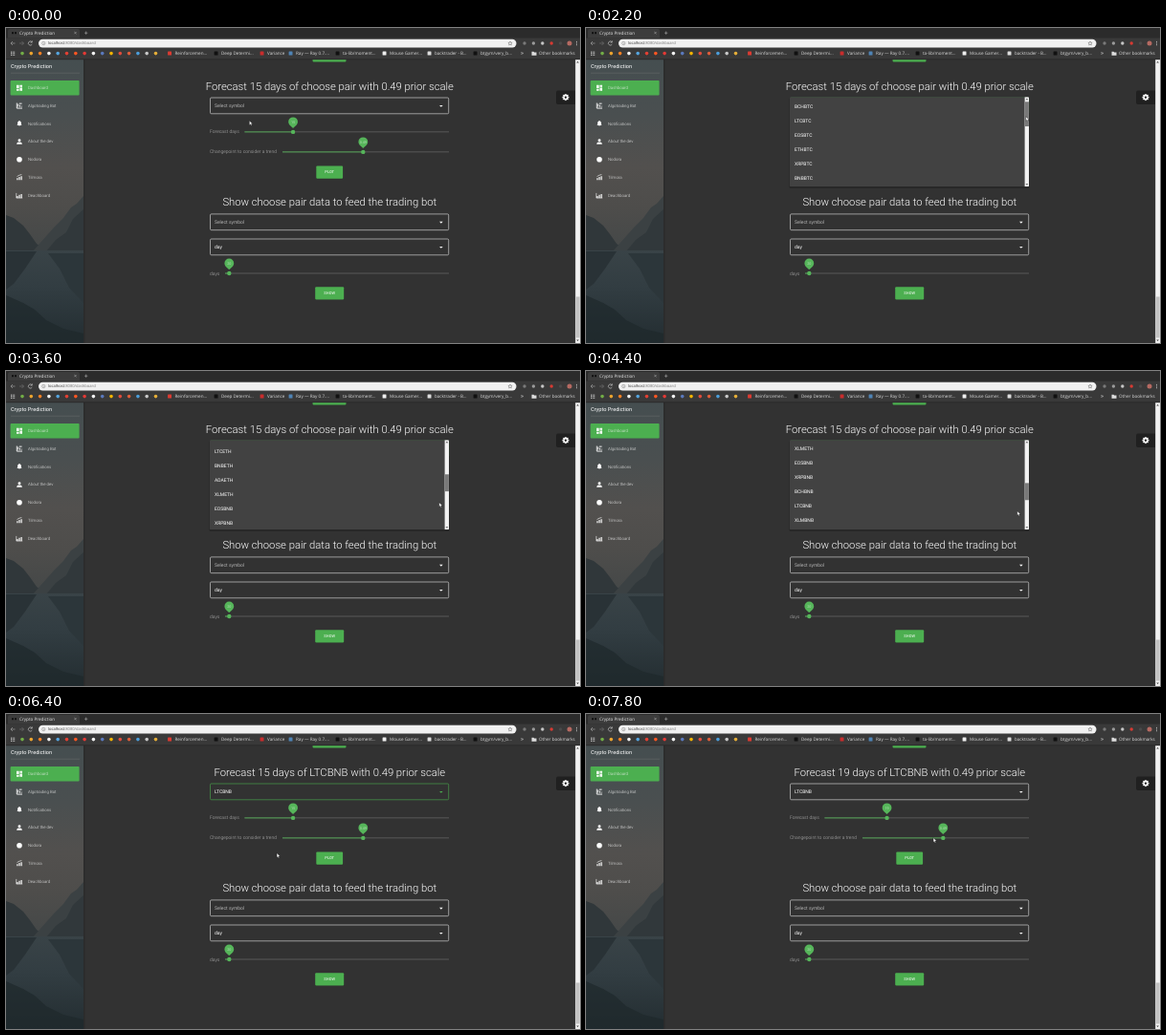
Recreate the animation shown at these times as an HTML page. Size 600x330 px, loop 8 s.

```html
<!DOCTYPE html>
<html lang="en">
<head>
<meta charset="utf-8">
<title>Crypto Prediction</title>
<style>
  html, body { margin: 0; width: 100%; height: 100%; overflow: hidden; background: #323232; }
  svg { display: block; width: 100vw; height: 100vh; font-family: Roboto, sans-serif; text-rendering: geometricPrecision; }
  .chrome { font-family: "Open Sans", sans-serif; }
</style>
</head>
<body>
<svg id="stage" viewBox="0 0 600 330"></svg>
<script>
const GREEN = '#4caf50', BORDER = '#e4e4e4';
const LOOP = 8000, STEP = 200;
const ROW = 15, LIST_TOP = 74.7, VIEW = 94, TRACK_TOP = 77.3, TRACK = 83.6;
const DAYS_X = 249.4, DAY_WIDTH = 3.62;

const pairs = (base, coins) => coins.split(' ').map(coin => coin + base);
const symbols = [
  ...pairs('BTC', 'BCH LTC EOS ETH XRP BNB ADA XLM'),
  ...pairs('ETH', 'EOS XRP BCH LTC BNB ADA XLM'),
  ...pairs('BNB', 'EOS XRP BCH LTC XLM ADA'),
  ...pairs('USDT', 'BCH LTC EOS ETH XRP BNB ADA XLM')
];

// Time, then one or more values
const cursorPath = [
  [0, 255.6, 99.4], [200, 255, 95], [400, 255, 86], [1000, 255, 86], [1200, 258, 88],
  [2000, 461, 95], [2400, 461, 95], [3400, 454, 138], [3600, 454, 140], [4400, 452, 149],
  [5000, 452, 149], [5800, 285, 148], [6200, 285, 148], [6400, 284.3, 148], [6800, 300, 109],
  [7000, 300, 109], [7400, 314, 109], [7800, 364.3, 132]
];
const scrollPath = [[2400, 0], [3400, 156], [3600, 163], [4400, 211]];
const menuFade = [[200, 0], [400, .6], [600, .94], [800, 1], [6000, 1], [6200, .6], [6400, 0]];
const daysPath = [[7000, 15], [7400, 19]];

function sample(path, t) {
  const next = path.findIndex(key => key[0] > t);
  if (next === 0) return path[0].slice(1);
  if (next < 0) return path[path.length - 1].slice(1);
  const a = path[next - 1], b = path[next];
  const k = (t - a[0]) / (b[0] - a[0]);
  return a.slice(1).map((v, i) => v + (b[i + 1] - v) * k);
}

const rect = (x, y, w, h, fill, more = '') =>
  `<rect x="${x}" y="${y}" width="${w}" height="${h}" fill="${fill}" ${more}/>`;
const dot = (x, y, r, fill, more = '') => `<circle cx="${x}" cy="${y}" r="${r}" fill="${fill}" ${more}/>`;
const path = (d, fill, more = '') => `<path d="${d}" fill="${fill}" ${more}/>`;
const stroke = (d, color, width, more = '') =>
  path(d, 'none', `stroke="${color}" stroke-width="${width}" ${more}`);
// y is the vertical middle of the line
const text = (x, y, s, size, fill = '#fff', more = '') =>
  `<text x="${x}" y="${y + size * .355}" font-size="${size}" fill="${fill}" ${more}>${s}</text>`;
const gradient = (id, ...stops) => `<linearGradient id="${id}" x2="0" y2="1">`
  + stops.map(([at, color]) => `<stop offset="${at}" stop-color="${color}"/>`).join('') + '</linearGradient>';
const centred = 'text-anchor="middle"';

function browser() {
  let out = rect(0, 0, 600, 33, '#393939') + rect(0, 0, 600, 10.5, '#2b2b2b')
    + path('M2 10.5V3Q2 1 4 1H75Q77 1 77 3V10.5Z', '#3c3c3c')
    + rect(6, 4.2, 2, 2, '#111') + rect(9, 4.2, 2, 2, '#111')
    + text(14, 5, 'Crypto Prediction', 4.6, '#e8e8e8')
    + stroke('M71.4 4l2.2 2.2m0-2.2l-2.2 2.2M82 5.2h3.4m-1.7-1.7v3.4', '#c0c0c0', .5)
    + stroke('M9.5 16H5m2-2l-2 2 2 2', '#aaa', .6)
    + stroke('M14 16h4.5m-2-2l2 2-2 2', '#777', .6)
    + stroke('M27 14.6A2.1 2.1 0 1 0 27.3 17M27.3 13.3v1.8h-1.8', '#d0d0d0', .6)
    + rect(34, 11.7, 499.5, 8.7, '#f1f1f1', 'rx="4.3"')
    + dot(39.3, 16, 1.7, 'none', 'stroke="#777" stroke-width=".5"') + rect(39.1, 15.6, .4, 1.4, '#777')
    + text(44, 16, '<tspan fill="#333">localhost</tspan>:8080/dashboard', 4.1, '#777')
    + stroke('M527 13.9l.6 1.4 1.5.2-1.1 1 .3 1.5-1.3-.8-1.3.8.3-1.5-1.1-1 1.5-.2z', '#555', .45);
  ['#7a7a7a', '#9a9a9a', '#c6c6c6', '#d63a32', '#4a4a4a'].forEach((c, i) => out += dot(542 + i * 9.4, 16, 1.7, c));
  out += dot(589, 16, 2.5, '#b56a62') + [14.2, 16, 17.8].map(y => dot(596.5, y, .5, '#ddd')).join('');

  for (let i = 0; i < 9; i++) out += rect(5 + i % 3 * 1.6, 24.6 + Math.floor(i / 3) * 1.6, 1, 1, '#ccc');
  ['#72ad47', '#eda52f', '#f48024', '#f2f2f2', '#56a5e0', '#e34033', '#ff5722', '#e53935', '#f2f2f2',
    '#5a79bd', '#f4b400', '#e24b3b', '#df5d3a', '#4b9edb', '#c9c9c9', '#e5ae38']
    .forEach((c, i) => out += dot(17 + i * 9.3, 26.6, 1.8, c));
  [[176.5, 'Reinforcemen...', '#dc3b32'], [225, 'Deep Determi...', '#111'], [273, 'Variance', '#c92c2c'],
    [303, 'Ray — Ray 0.7....', '#4f83b5'], [352, 'ta-lib/moment...', '#111'], [401, 'Mouse Gamer...', '#eee'],
    [448, 'backtrader - B...', '#ddd'], [496, 'btgym/very_b...', '#111']]
    .forEach(([x, s, c]) => out += rect(x - 7.4, 24.6, 3.9, 3.9, c, 'rx=".5"') + text(x, 26.4, s, 4.6, '#dadada'));
  return out + text(538, 26, '»', 6, '#ddd') + path('M549.5 24.7h2l.7.7h2.3v3.3h-5z', '#ddd')
    + text(557, 26.4, 'Other bookmarks', 4.6, '#dadada') + rect(0, 32.5, 600, .7, '#252525');
}

function sidebar() {
  const items = ['Dashboard', 'Algotrading Bot', 'Notifications', 'About the dev', 'Nodora', 'Tilmora', 'Deachboard'];
  const bars = path('M-2.7.6h1.2v2.2h-1.2zM-.6-.6H.6v3.4H-.6zM1.5-1.4h1.2v4.2H1.5z', '#fff');
  const icons = [
    path('M-3-3h2.6v3.4h-2.6zM.4-3H3v2H.4zM-3 1.1h2.6V3h-2.6zM.4-.3H3V3H.4z', '#fff'),
    stroke('M-2.7-3v5.5H3M-1.2 1v-3M.5 1v-1.8M2.2 1v-1M-.2-2.4H2.6', '#fff', .9),
    path('M-2.6 1.8l.7-.8v-1.7q0-1.7 1.3-2.1a.6.6 0 0 1 1.2 0q1.3.4 1.3 2.1v1.7l.7.8zM-.7 2.3h1.4q-.7 1-1.4 0', '#fff'),
    dot(0, -1.4, 1.45, '#fff') + path('M-2.8 2.6V1.9Q-2.4.5 0 .5t2.8 1.4v.7z', '#fff'),
    dot(0, 0, 2.8, '#fff'),
    bars + stroke('M-2.5-1L0-2.4 2.4-3', '#fff', .6),
    bars + stroke('M-3.2-2.4v5.2H3.2', '#fff', .6)
  ];
  return gradient('sky', [0, '#454e50'], [.2, '#4a4f50'], [.38, '#52504e'], [.52, '#4e4d4b'], [.66, '#454848'])
    + gradient('water', [0, '#394347'], [.4, '#323d42'], [1, '#232d31'])
    + rect(0, 33, 81, 297, 'url(#sky)')
    + path('M0 196L8 199 18 207 25 216 32 226 40 232 81 234V246H0Z', '#30373a')
    + path('M81 176L74 184 68 188 60 199 51 208 43 217 35 226 28 234 81 238Z', '#3b4143')
    + path('M81 190L70 200 63 214 52 222 42 234H81Z', '#31383b')
    + rect(0, 233, 81, 97, 'url(#water)')
    + path('M0 234H32L20 252 8 268 0 274Z', '#293236')
    + path('M81 236H44L56 252 66 272 81 288Z', '#2c363a')
    + path('M0 280L18 288 30 295 42 306 60 315 81 320V330H0Z', '#1f282c', 'opacity=".7"')
    + text(5, 39.8, 'Crypto Prediction', 5.625)
    + rect(5, 46.9, 72, .35, '#747a7a')
    + rect(4.6, 55, 72, 15.6, GREEN, 'rx="1"')
    + items.map((s, i) => {
      const y = 62.8 + i * 18.75;
      return `<g transform="translate(14 ${y})">${icons[i]}</g>` + text(23, y - .2, s, 4.375, '#f2f2f2', 'font-weight="300"');
    }).join('');
}

const selectBox = (y, label, color, id = '') =>
  rect(213.5, y, 249.2, 16.8, 'none', `rx="1.2" stroke="${BORDER}" stroke-width=".6" ${id && `id="${id}Box"`}`)
  + text(218, y + 8.5, label, 5, color, id && `id="${id}Label"`)
  + path(`M453 ${y + 7.9}h3.7l-1.85 1.9z`, '#fff', id && `id="${id}Arrow"`);

const button = (x, y, w, h, s) =>
  rect(x, y + .5, w, h, '#222', 'rx="1" opacity=".4"') + rect(x, y, w, h, GREEN, 'rx="1"')
  + text(x + w / 2, y + h / 2 - .1, s, 4.06, '#dcefdc', centred + ' font-weight="500"');

const slider = (y, label, start, x, value, id) =>
  text(213, y - .2, label, 5, '#b4b4b4', 'font-weight="300"')
  + rect(start, y - .3, 463 - start, .6, '#707070')
  + rect(start, y - .4, x - start, .8, GREEN, `id="${id}Fill"`)
  + `<g id="${id}Thumb" transform="translate(${x} ${y})">` + dot(0, 0, 2.2, '#56b55a')
  + path('M0-4C-2-5.9-4.9-7.6-4.9-10.6A4.9 4.9 0 1 1 4.9-10.6C4.9-7.6 2-5.9 0-4Z', '#56b55a')
  + text(0, -10.7, value, 3.75, '#b4dfb5', `${centred} id="${id}Value"`) + '</g>';

function settings() {
  let teeth = '';
  for (let a = 0; a < 360; a += 45) teeth += rect(-.75, -3.5, 1.5, 2, '#fff', `transform="rotate(${a})"`);
  return path('M595 65.5H577Q575 65.5 575 67.5V78Q575 80 577 80H595Z', '#202020')
    + `<g transform="translate(585 72.6)">${teeth}${dot(0, 0, 1.9, 'none', 'stroke="#fff" stroke-width="1.3"')}</g>`;
}

const heading = (y, s, id) => text(338.3, y, s, 11.25, '#fff', `${centred} font-weight="300" id="${id}"`);

const menu = () => `<clipPath id="panel">${rect(213, 72.2, 250, VIEW, '#000', 'rx="1"')}</clipPath><g id="menu">`
  + rect(212.5, 73, 251, 95, '#1c1c1c', 'rx="1.5" opacity=".5"')
  + '<g clip-path="url(#panel)">' + rect(213, 72.2, 250, VIEW, '#424242') + '<g id="rows">'
  + rect(213, 0, 246, ROW, '#505050', 'id="hover"')
  + symbols.map((s, i) => text(218, LIST_TOP + ROW * (i + .5), s, 5)).join('') + '</g>'
  + rect(458.6, 72.2, 4.6, VIEW, '#f1f1f1')
  + path('M459.6 75.3h2.6l-1.3-1.6zM459.6 163.2h2.6l-1.3 1.6z', '#505050')
  + rect(458.9, TRACK_TOP, 4, 25, '#a8a8a8', 'id="bar"') + '</g></g>';

const pageScrollbar = () => rect(595.2, 33, 4.8, 297, '#f1f1f1')
  + rect(595.6, 281.5, 4, 43, '#c1c1c1')
  + path('M596.3 36.4h2.6l-1.3-1.6zM596.3 326.6h2.6l-1.3 1.6z', '#505050');

const stage = document.getElementById('stage');
stage.innerHTML = rect(0, 0, 600, 330, '#323232')
  + sidebar()
  + rect(81, 33, 1.5, 297, '#2b2b2b')
  + button(320.5, 24, 35, 11.5, '')
  + heading(60.6, '', 'title')
  + selectBox(73, 'Select symbol', '#b5b5b5', 'pair')
  + slider(108.9, 'Forecast days', DAYS_X, 300, '15', 'days')
  + slider(129.9, 'Changepoint to consider a trend', 289, 373.3, '0.49', 'trend')
  + button(324.3, 144.4, 27.8, 13.4, 'PLOT')
  + heading(182.4, 'Show choose pair data to feed the trading bot', 'subtitle')
  + selectBox(194.9, 'Select symbol', '#b5b5b5')
  + selectBox(221, 'day', '#fff')
  + slider(257, 'days', 229, 233.3, '20', 'period')
  + button(323.2, 271.2, 30, 13.4, 'SHOW')
  + settings() + menu() + pageScrollbar()
  + `<g class="chrome">${browser()}</g>`
  + '<g id="cursor">' + path('M0 0V4.6L1.1 3.7 1.8 5.2 2.6 4.8 1.9 3.4H3.3Z', '#fff', 'stroke="#111" stroke-width=".35" id="arrow"')
  + path('M.2.2Q.8-.3 1.2.3V2L3.6 2.5Q4.3 2.7 4.1 3.5L3.6 5.2H1.2L-.6 3.2Q-.4 2.5.2 2.9Z', '#fff', 'stroke="#111" stroke-width=".35" id="hand"') + '</g>';

const el = id => document.getElementById(id);
const set = (id, attrs) => Object.entries(attrs).forEach(([name, value]) => el(id).setAttribute(name, value));
const show = (id, on) => set(id, { visibility: on ? 'inherit' : 'hidden' });

function draw(t) {
  const [x, y] = sample(cursorPath, t);
  const [scroll] = sample(scrollPath, t);
  const [opacity] = sample(menuFade, t);
  const days = Math.round(sample(daysPath, t)[0]);
  const chosen = t >= 6200, dragging = t >= 2200 && t < 4600;
  const focused = t >= 400 && t < 7000;

  el('title').textContent = `Forecast ${days} days of ${chosen ? 'LTCBNB' : 'choose pair'} with 0.49 prior scale`;
  el('pairLabel').textContent = chosen ? 'LTCBNB' : 'Select symbol';
  set('pairLabel', { fill: chosen ? '#fff' : '#b5b5b5' });
  set('pairBox', { stroke: focused ? GREEN : BORDER });
  set('pairArrow', { fill: focused ? GREEN : '#fff' });

  const daysX = DAYS_X + (days - 1) * DAY_WIDTH;
  set('daysFill', { width: daysX - DAYS_X });
  set('daysThumb', { transform: `translate(${daysX} 108.9)` });
  el('daysValue').textContent = days;

  // More rows load once scrolling begins, so the bar shrinks
  const content = (scroll > 0 ? symbols.length : 20) * ROW + 5;
  const bar = TRACK * VIEW / content;
  set('menu', { opacity });
  set('rows', { transform: `translate(0 ${-scroll})` });
  set('bar', {
    y: TRACK_TOP + scroll / (content - VIEW) * (TRACK - bar),
    height: bar,
    fill: dragging ? '#787878' : '#a8a8a8'
  });

  const overRows = opacity > .5 && !dragging && x < 458;
  const row = Math.floor((y - LIST_TOP + scroll) / ROW);
  set('hover', { y: LIST_TOP + row * ROW });
  show('hover', overRows);
  show('hand', overRows);
  show('arrow', !overRows);
  set('cursor', { transform: `translate(${x - 1.2} ${y - 2.3})` });
}

function tick(now) {
  draw(Math.floor(now % LOOP / STEP) * STEP);
  requestAnimationFrame(tick);
}
draw(0);
requestAnimationFrame(tick);
</script>
</body>
</html>
```
